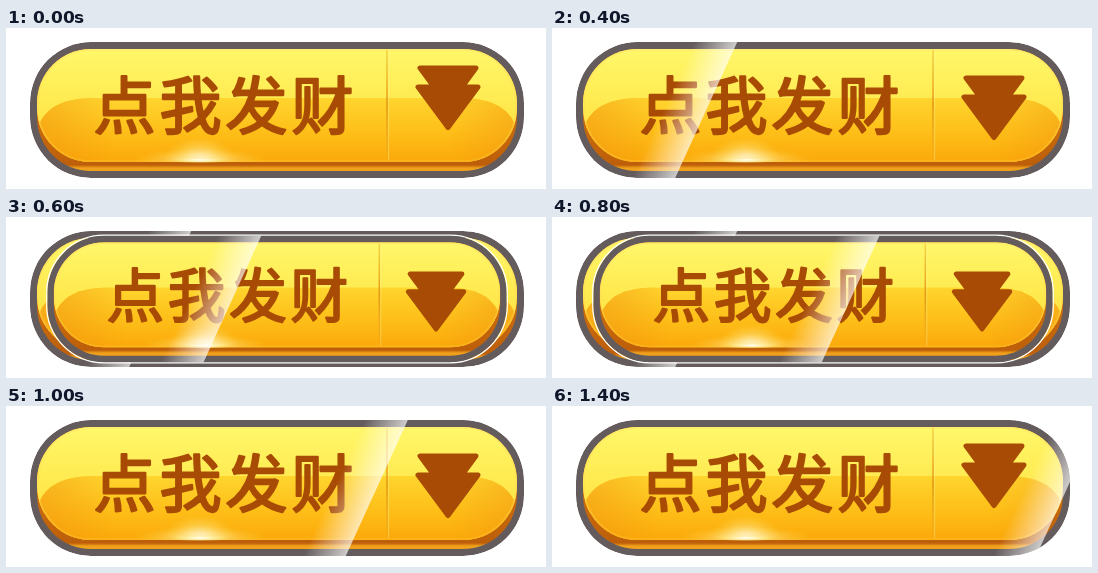
Recreate the animation shown at these times as an HTML page. Size 540 by 161 pixels, loop 1.5 s.

```html
<!DOCTYPE html>
<html lang="zh-CN">
<head>
<meta charset="utf-8">
<title>点我发财</title>
<style>
html, body { margin: 0; width: 100%; height: 100%; overflow: hidden; background: #fff; }
svg { display: block; width: 540px; height: 161px; }
text { font: 400 62px "Noto Sans CJK SC", "Noto Sans CJK", "Noto Sans CJK JP", sans-serif; }
</style>
</head>
<body>
<svg id="stage" viewBox="0 0 540 161" xmlns="http://www.w3.org/2000/svg">
  <defs>
    <linearGradient id="top" gradientUnits="userSpaceOnUse" x1="0" y1="21" x2="0" y2="100">
      <stop offset="0" stop-color="#fff76a"/><stop offset="1" stop-color="#ffe444"/>
    </linearGradient>
    <linearGradient id="low" gradientUnits="userSpaceOnUse" x1="0" y1="70" x2="0" y2="134">
      <stop offset="0" stop-color="#ffd52e"/><stop offset=".5" stop-color="#fec01a"/><stop offset="1" stop-color="#fba90a"/>
    </linearGradient>
    <linearGradient id="ends" gradientUnits="userSpaceOnUse" x1="31" y1="0" x2="511" y2="0">
      <stop offset="0" stop-color="#ec860c" stop-opacity=".4"/><stop offset=".16" stop-color="#ec860c" stop-opacity="0"/>
      <stop offset=".86" stop-color="#ec860c" stop-opacity="0"/><stop offset="1" stop-color="#ec860c" stop-opacity=".35"/>
    </linearGradient>
    <linearGradient id="rim" gradientUnits="userSpaceOnUse" x1="0" y1="100" x2="0" y2="143">
      <stop offset="0" stop-color="#c8690d"/><stop offset=".86" stop-color="#bd5f0a"/>
      <stop offset=".93" stop-color="#f0a01a"/><stop offset="1" stop-color="#f0a01a"/>
    </linearGradient>
    <linearGradient id="edge" gradientUnits="userSpaceOnUse" x1="0" y1="21" x2="0" y2="134">
      <stop offset="0" stop-color="#ffe76a" stop-opacity=".7"/><stop offset="1" stop-color="#ffd040" stop-opacity=".3"/>
    </linearGradient>
    <linearGradient id="split" gradientUnits="userSpaceOnUse" x1="0" y1="22" x2="0" y2="132">
      <stop offset="0" stop-color="#f0b41c" stop-opacity=".5"/><stop offset=".5" stop-color="#e39a12"/>
      <stop offset="1" stop-color="#e39a12" stop-opacity=".1"/>
    </linearGradient>
    <radialGradient id="glow">
      <stop offset="0" stop-color="#fff"/><stop offset=".3" stop-color="#fff6c4" stop-opacity=".85"/>
      <stop offset="1" stop-color="#ffe050" stop-opacity="0"/>
    </radialGradient>
    <linearGradient id="light">
      <stop offset="0" stop-color="#fff" stop-opacity="0"/><stop offset="1" stop-color="#fff" stop-opacity=".68"/>
    </linearGradient>
    <clipPath id="pill"><rect x="24" y="14" width="494" height="136" rx="61"/></clipPath>
    <clipPath id="face"><rect x="31" y="21" width="480" height="113" rx="54"/></clipPath>

    <g id="plate">
      <rect x="24" y="14" width="494" height="136" rx="61" fill="#645c5c"/>
      <rect x="31" y="21" width="480" height="122" rx="54" fill="url(#rim)"/>
      <g clip-path="url(#face)">
        <rect x="31" y="21" width="480" height="113" fill="url(#top)"/>
        <path id="gloss" d="M30 104C38 78 58 70 90 70H452C484 70 504 78 512 104V136H30Z" fill="url(#low)"/>
        <use href="#gloss"/>
        <path d="M30 104C38 78 58 70 90 70H452C484 70 504 78 512 104V136H30Z" fill="url(#ends)"/>
        <path d="M381 21V132" stroke="url(#split)" stroke-width="1.6"/>
        <path d="M382.6 21V132" stroke="#fff3a0" stroke-opacity=".4"/>
        <ellipse cx="194" cy="132" rx="66" ry="12" fill="url(#glow)" opacity=".55"/>
        <ellipse cx="194" cy="132" rx="36" ry="23" fill="url(#glow)" opacity=".7"/>
      </g>
      <rect x="32" y="22" width="478" height="111" rx="53" fill="none" stroke="url(#edge)" stroke-width="1.6"/>
      <ellipse cx="194" cy="132" rx="30" ry="3.4" fill="url(#glow)"/>
      <g fill="#a84b04" stroke="#a84b04" stroke-width="2.3" stroke-linejoin="round">
        <text x="87.6 153.6 219.6 285.6" y="101">点我发财</text>
      </g>
    </g>
    <path id="arrow" d="M414 40H470L442 78ZM412 59H472L442 99.5Z" fill="#a84b04" stroke="#a84b04" stroke-width="5" stroke-linejoin="round"/>
  </defs>
</svg>
<script>
const STEP = 100, STEPS = 15, SLANT = 0.456, CX = 271, CY = 82;
const stage = document.getElementById('stage');

function layer(scale) {
  const g = document.createElementNS(stage.namespaceURI, 'g');
  const fit = s => `matrix(${s} 0 0 ${s} ${CX * (1 - s)} ${CY * (1 - s)})`;
  const fringe = scale < 1
    ? '<rect x="23.4" y="13.4" width="495.2" height="137.2" rx="61.6" fill="none" stroke="#fff" stroke-width="1.4"/>' : '';
  g.setAttribute('transform', fit(scale));
  g.innerHTML = `${fringe}<g clip-path="url(#pill)"><use href="#plate"/><use href="#arrow" class="arrow"/>
    <g transform="${fit(1 / scale)}"><rect class="shine" x="-43" y="12" width="43" height="140" fill="url(#light)"/></g></g>`;
  stage.append(g);
  const arrow = g.querySelector('.arrow'), shine = g.querySelector('.shine');
  return {
    show(on) { g.style.display = on ? '' : 'none'; },
    pose(k) {
      const bob = 17.5 * (1 - Math.abs(k - 7) / 7);
      const x = 40.8 + 36.1 * k + SLANT * 14;
      arrow.setAttribute('transform', `translate(0 ${bob.toFixed(2)})`);
      shine.setAttribute('transform', `matrix(1 0 ${-SLANT} 1 ${x.toFixed(2)} 0)`);
    }
  };
}

const full = layer(1), small = layer(0.93);

// While the button is pressed in, the full one stays behind it as it last was.
function draw(k) {
  const pressed = k >= 5 && k <= 9;
  full.pose(pressed ? 4 : k);
  small.pose(k);
  small.show(pressed);
}

const start = performance.now();
function tick() {
  draw(Math.floor((performance.now() - start) / STEP) % STEPS);
  requestAnimationFrame(tick);
}
draw(0);
requestAnimationFrame(tick);
</script>
</body>
</html>
```
